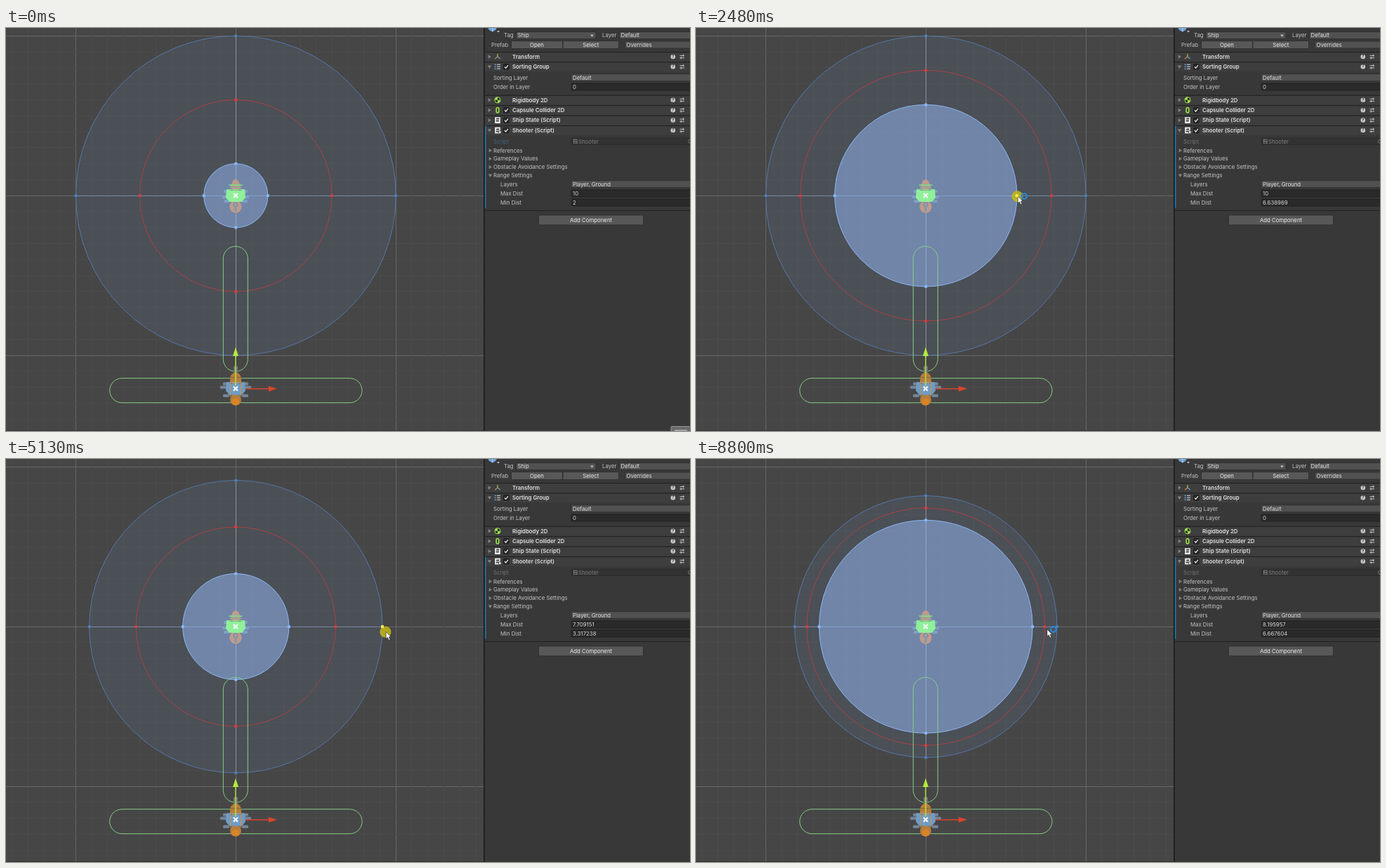
An HTML page with a canvas that plays this animation: 974x575 px, repeating every 8860 ms.

```html
<!DOCTYPE html>
<html>
<head>
<meta charset="utf-8">
<style>
html, body { margin: 0; width: 974px; height: 575px; overflow: hidden; background: #383838 }
canvas { display: block }
</style>
</head>
<body>
<canvas id="stage" width="974" height="575"></canvas>
<script>
const view = document.getElementById('stage').getContext('2d');
const LOOP = 8860, UNIT = 22.79, CX = 327.3, CY = 239.2, TAU = Math.PI * 2;
let g = view;

// Keys are [time, value, ...]
const minKeys = [[970, 2], [1250, 2.12], [1520, 2.4], [1590, 2.52], [1850, 5.4], [2130, 6.639], [2410, 6.639],
  [2480, 5.7], [2760, 3.9], [2900, 3.317], [6440, 3.317], [6580, 3.72], [6650, 4.446], [7000, 6.35], [7200, 6.668]];
const maxKeys = [[3840, 10], [4160, 9.11], [4440, 7.709], [4790, 7.709], [5130, 9.15], [5300, 10.344],
  [8100, 10.344], [8170, 10.24], [8590, 8.196]];
const cursorKeys = [[0, 1000, 590], [70, 976, 560], [300, 780, 420], [550, 520, 285], [830, 380, 240], [970, 379, 239],
  [1590, 391, 239], [1850, 454, 240], [2130, 481, 240], [2410, 480, 240], [2480, 458.5, 240], [2760, 414, 241],
  [2900, 404, 241], [3120, 405, 241], [3330, 470, 242], [3580, 554, 240], [3840, 556, 239], [4160, 534, 239.5],
  [4440, 504, 242], [4790, 506, 244], [5130, 541, 246.5], [5300, 567, 251], [5340, 563, 254], [5540, 563, 254],
  [5800, 510, 249], [6150, 420, 241], [6440, 408.5, 240], [6650, 434.5, 241], [7200, 482, 241], [7350, 482, 242],
  [7600, 528, 243], [7920, 567, 241], [8100, 567, 241], [8170, 563, 241], [8590, 514, 242], [8800, 500, 243]];
const minText = [[0, '2'], [1520, '2.45817'], [1720, '3.506714'], [2200, '6.638969'], [2900, '3.317238'],
  [6580, '3.718136'], [6860, '5.602347'], [7230, '6.667604']];
const maxText = [[0, '10'], [4500, '7.709151'], [5320, '10.34363'], [8650, '8.195957']];
const presses = [[930, 2950, 'min'], [3780, 5320, 'max'], [6420, 7250, 'min'], [8050, 8640, 'max']];

function sample(keys, t) {
  const i = keys.findIndex(k => k[0] > t);
  if (i === 0) return keys[0].slice(1);
  if (i < 0) return keys[keys.length - 1].slice(1);
  const a = keys[i - 1], b = keys[i], f = (t - a[0]) / (b[0] - a[0]);
  return a.slice(1).map((v, j) => v + (b[j + 1] - v) * f);
}
const held = (keys, t) => keys.filter(k => k[0] <= t).pop()[1];

function box(x, y, w, h, color) { g.fillStyle = color; g.fillRect(x, y, w, h); }
function dot(x, y, r, color) { g.fillStyle = color; g.beginPath(); g.arc(x, y, r, 0, TAU); g.fill(); }
function ring(x, y, r, color, width = 1) {
  g.strokeStyle = color; g.lineWidth = width;
  g.beginPath(); g.arc(x, y, r, 0, TAU); g.stroke();
}
function oval(x, y, rx, ry, color) {
  g.fillStyle = color; g.beginPath(); g.ellipse(x, y, rx, ry, 0, 0, TAU); g.fill();
}
function poly(color, ...p) {
  g.fillStyle = color; g.beginPath();
  for (let i = 0; i < p.length; i += 2) g.lineTo(p[i], p[i + 1]);
  g.closePath(); g.fill();
}
function line(color, width, ...p) {
  g.strokeStyle = color; g.lineWidth = width; g.beginPath();
  for (let i = 0; i < p.length; i += 2) g.lineTo(p[i], p[i + 1]);
  g.stroke();
}
function rounded(x, y, w, h, r, fill, stroke) {
  g.beginPath(); g.roundRect(x, y, w, h, r);
  if (fill) { g.fillStyle = fill; g.fill(); }
  if (stroke) { g.strokeStyle = stroke; g.lineWidth = 1; g.stroke(); }
}
function text(s, x, y, color = '#c4c4c4', weight = 400, align = 'left') {
  g.font = weight + ' 7.8px Inter, sans-serif';
  g.textAlign = align; g.textBaseline = 'alphabetic';
  g.fillStyle = color; g.fillText(s, x, y + 2.8);
}

// Inspector panel
function foldout(x, y, open) {
  if (open) poly('#858585', x - 2.7, y - 1.8, x + 2.7, y - 1.8, x, y + 2.5);
  else poly('#808080', x - 1.8, y - 2.7, x - 1.8, y + 2.7, x + 2.5, y);
}
function dropdown(x, y, w, label) {
  rounded(x, y - 5, w, 10, 1.5, '#515151', '#303030');
  text(label, x + 2, y, '#e0e0e0');
  if (x + w < 974) poly('#c4c4c4', x + w - 8, y - 1, x + w - 3, y - 1, x + w - 5.5, y + 2);
}
function button(x, y, w, h, label) {
  rounded(x, y, w, h, 1.5, '#585858', '#303030');
  text(label, x + w / 2, y + h / 2, '#eee', 400, 'center');
}
function field(y, value) {
  rounded(805, y - 5, 180, 10, 1.5, '#2a2a2a', '#212121');
  text(value, 807, y, '#d2d2d2');
}
function header(y, title, icon, checked, open) {
  box(682, y - 6.5, 292, 13.5, '#3e3e3e');
  box(682, y - 7, 292, 1, '#1f1f1f');
  foldout(688.5, y, open);
  icon(700, y);
  if (checked) {
    rounded(708.5, y - 3.7, 7.5, 7.5, 1, '#292929', '#1c1c1c');
    line('#eee', 1.2, 710, y, 711.7, y + 2, 715, y - 2.2);
  }
  text(title, 721, y, '#e0e0e0', 600);
  dot(949.8, y, 3.3, '#c8c8c8');
  g.font = '700 5.5px Inter, sans-serif'; g.textAlign = 'center';
  g.fillStyle = '#333'; g.fillText('?', 949.8, y + 2);
  line('#c4c4c4', 1, 959.5, y - 1.6, 966, y - 1.6);
  line('#c4c4c4', 1, 959.5, y + 1.7, 966, y + 1.7);
  line('#c4c4c4', 1, 964.3, y - 3.3, 964.3, y);
  line('#c4c4c4', 1, 961.2, y, 961.2, y + 3.4);
}
const axesIcon = (x, y) => {
  line('#b5d94c', 1.1, x, y, x, y - 4);
  line('#e0823c', 1.1, x, y, x - 4, y + 3);
  line('#58a6dc', 1.1, x, y, x + 4, y + 3);
};
const layersIcon = (x, y) => {
  for (const d of [-3, 0, 3]) { box(x - 1, y + d - .7, 5, 1.4, '#a9b5c2'); box(x - 4.3, y + d - .7, 2, 1.4, '#6fa8dc'); }
};
const bodyIcon = (x, y) => {
  dot(x, y, 4.5, '#9be04a');
  poly('#272727', x, y, x, y - 3.7, x + 3, y - 2.2, x + 3.7, y);
  poly('#272727', x, y, x, y + 3.7, x - 3, y + 2.2, x - 3.7, y);
};
const capsuleIcon = (x, y) => {
  rounded(x - 2.6, y - 4.5, 5.2, 9, 2.6, '#9be04a');
  rounded(x - 1, y - 2.9, 2, 5.8, 1, '#34432a');
};
const scriptIcon = (x, y) => {
  box(x - 3.8, y - 4.4, 7.6, 8.8, '#eee');
  text('#', x, y, '#3a3a3a', 700, 'center');
};
const shooterIcon = (x, y) => { scriptIcon(x, y); dot(x + 3.2, y + 2.6, 2.2, '#eee'); ring(x + 3.2, y + 2.6, 1.9, '#333', .8); };

function drawPanel() {
  box(680, 0, 294, 575, '#383838');
  box(680, 0, 1.6, 575, '#1c1c1c');
  poly('#6fa3d8', 686.5, 0, 699, 0, 697, 3, 693, 5.5, 688, 3);
  line('#b8d6f4', 1, 692.8, 0, 692.8, 5);
  poly('#c4c4c4', 699, 4, 703, 4, 701, 6.5);
  text('Tag', 709, 10.5); dropdown(726.5, 10.5, 113.5, 'Ship');
  text('Layer', 849, 10.5); dropdown(873.5, 10.5, 110, 'Default');
  text('Prefab', 691, 24.3);
  button(719.5, 18.5, 73, 11, 'Open'); button(793, 18.5, 79.5, 11, 'Select');
  dropdown(881.5, 24, 110, 'Overrides');
  header(41, 'Transform', axesIcon);
  header(55.3, 'Sorting Group', layersIcon, true, true);
  text('Sorting Layer', 694, 71); dropdown(805, 70.7, 180, 'Default');
  text('Order in Layer', 694, 84); field(84, '0');
  header(102.7, 'Rigidbody 2D', bodyIcon);
  header(117.2, 'Capsule Collider 2D', capsuleIcon, true);
  header(131.6, 'Ship State (Script)', scriptIcon, true);
  header(146, 'Shooter (Script)', shooterIcon, true, true);
  rounded(805, 157, 180, 9.5, 1.5, '#323232', '#2c2c2c');
  box(808, 158.7, 5.5, 6.4, '#8a8a8a');
  text('#', 810.7, 161.8, '#333', 700, 'center');
  text('Shooter', 815, 161.8, '#7c7c7c');
  ring(974, 161.8, 2.5, '#777');
  ['References', 'Gameplay Values', 'Obstacle Avoidance Settings', 'Range Settings'].forEach((s, i) => {
    foldout(689.5, 174.7 + i * 11.9, i === 3);
    text(s, 694, 174.7 + i * 11.9);
  });
  text('Layers', 704, 223); dropdown(805, 222.7, 180, 'Player, Ground');
  text('Max Dist', 704, 236); text('Min Dist', 704, 249);
  box(682, 139.5, 1.5, 117, '#1c78b4');
  box(682, 260, 292, 1, '#1f1f1f');
  button(758.5, 267, 149, 14, 'Add Component');
}

function drawGround() {
  box(0, 0, 681, 575, '#464646');
  for (let i = -15; i <= 16; i++) {
    const major = i % 10 === 0, color = major ? '#686868' : '#4b4b4b';
    box(Math.round(CX + i * UNIT - .5), 0, 1, 575, color);
    box(0, Math.round(CY + i * UNIT - .5), 681, 1, color);
  }
  box(0, 574, 681, 1, '#343434');
}

// Scene objects above the range discs
function drawShip(y, hull, wood, guns, trim, narrow) {
  const x = 327;
  g.save(); g.translate(x, y);
  for (const s of [-1, 1]) {
    for (const d of narrow ? [-7, -2, 10] : [-6, 2, 8]) {
      const reach = narrow ? (d === -2 ? 22 : 18) : (d === 2 ? 19 : 17);
      rounded(s > 0 ? 9 : -reach, d - 2, reach - 9, 4.3, 1.5, guns);
    }
  }
  if (narrow) box(-3, -32, 6, 10, '#737679');
  oval(0, -14, narrow ? 8 : 6, narrow ? 9 : 9, wood);
  oval(0, 16, narrow ? 8 : 8.7, narrow ? 8 : 9, wood);
  if (narrow) {
    line('#8a6a36', 1.3, -7, -16, 7, -16);
    oval(0, 19, 5.5, 5, '#d88426');
  } else {
    poly('#a8a08f', -6, -17, 6, -17, 8, -10, -8, -10);
    box(-9.5, -15.6, 19, 1.6, trim);
    ring(0, 13, 2.7, '#6f91b2', 1.5);
    box(-1.5, 15, 3, 8, '#7d99b2');
  }
  poly(hull, -13, -9, -6, -7, 6, -7, 13, -9, 14, 3, 9, 9, -9, 9, -14, 3);
  line(trim, 1.2, -12, -8.5, 12, -8.5);
  for (const a of [0, Math.PI / 2]) {
    g.save(); g.rotate(a + Math.PI / 4);
    rounded(-4.5, -1.2, 9, 2.4, 1, '#f4f6f1');
    g.restore();
  }
  g.restore();
}
function drawObjects() {
  g.lineWidth = 1;
  for (const [x, y, w, h] of [[309.3, 311.5, 35, 178.5], [147.7, 499.7, 186.5, 35], [320.3, 499.7, 186.7, 35]])
    rounded(x, y, w, h, 17.5, null, '#86cf86');
  drawShip(239, '#8ff09a', '#bf9b8b', '#7f9fc4', '#83dc8b', false);
  drawShip(514.5, '#6e9cc6', '#b67d3e', '#74859a', '#83afd4', true);
  line('#e08a2c', 1, 319.5, 503, 319.5, 526);
  line('#e08a2c', 1, 334.5, 503, 334.5, 526);
  line('#b3ea3c', 1.4, 327, 510, 327, 467);
  poly('#b3ea3c', 327, 455.5, 323, 468, 331, 468);
  line('#d8452c', 1.4, 341, 514.8, 375, 514.8);
  poly('#d8452c', 386, 514.8, 374, 510.8, 374, 518.8);
}

// Static layers are rendered once
function layer(draw) {
  const c = document.createElement('canvas');
  c.width = 974; c.height = 575;
  g = c.getContext('2d');
  draw();
  g = view;
  return c;
}
const ground = layer(() => { drawGround(); drawPanel(); });
const objects = layer(drawObjects);

function handles(r, color, size) {
  for (const [dx, dy] of [[1, 0], [-1, 0], [0, 1], [0, -1]])
    box(CX + dx * r - size / 2, CY + dy * r - size / 2, size, size, color);
}
function drawRange(min, max) {
  const inner = min * UNIT, outer = max * UNIT, mid = (inner + outer) / 2;
  dot(CX, CY, outer, 'rgba(120,160,220,.1)');
  ring(CX, CY, outer, '#5378aa');
  line('rgba(130,160,205,.55)', 1, CX - outer, 239.5, CX + outer, 239.5);
  line('rgba(180,185,195,.5)', 1, 327.5, CY - outer, 327.5, CY + outer);
  dot(CX, CY, inner, 'rgba(150,188,250,.5)');
  ring(CX, CY, inner, '#8cb8f4');
  ring(CX, CY, mid, '#a84246');
  handles(outer, '#4c80c0', 3.6);
  handles(mid, '#e23838', 3.6);
  handles(inner, '#85b9ff', 3.8);
}
function drawCursor(x, y, pressed, busy) {
  if (pressed) dot(x - .8, y + .2, 8, 'rgba(196,184,22,.85)');
  if (busy) ring(x + 9, y, 3.8, '#2c86d4', 2.2);
  g.save(); g.translate(x, y);
  poly('#fff', 0, 0, 0, 10, 2.3, 8, 4, 12, 5.8, 11.2, 4.2, 7.3, 7, 7.2);
  g.strokeStyle = '#222'; g.lineWidth = .6; g.stroke();
  g.restore();
}

function draw(now) {
  const t = now % LOOP;
  const [min] = sample(minKeys, t), [max] = sample(maxKeys, t), [x, y] = sample(cursorKeys, t);
  const press = presses.find(p => t >= p[0] && t < p[1]);
  g.drawImage(ground, 0, 0);
  g.save();
  g.beginPath(); g.rect(0, 0, 680, 575); g.clip();
  drawRange(min, max);
  g.drawImage(objects, 0, 0);
  g.restore();
  text('Script', 694, 161.8, t < 950 ? '#47647d' : '#747474');
  field(236, held(maxText, t));
  field(249, held(minText, t));
  if (t < 70) {
    rounded(947, 568.5, 40, 15, 1, '#6a6a6a', '#949494');
    box(952, 573.5, 18, 1.5, '#b4b4b4');
  }
  const busy = t > 950 && t < 2950 || t > 6400;
  drawCursor(x, y, press, busy);
  if (press) {
    const r = (press[2] === 'min' ? min : max) * UNIT;
    box(CX + r - 2, CY - 2, 4, 4, '#f4ea55');
  }
  requestAnimationFrame(draw);
}
requestAnimationFrame(draw);
</script>
</body>
</html>
```
